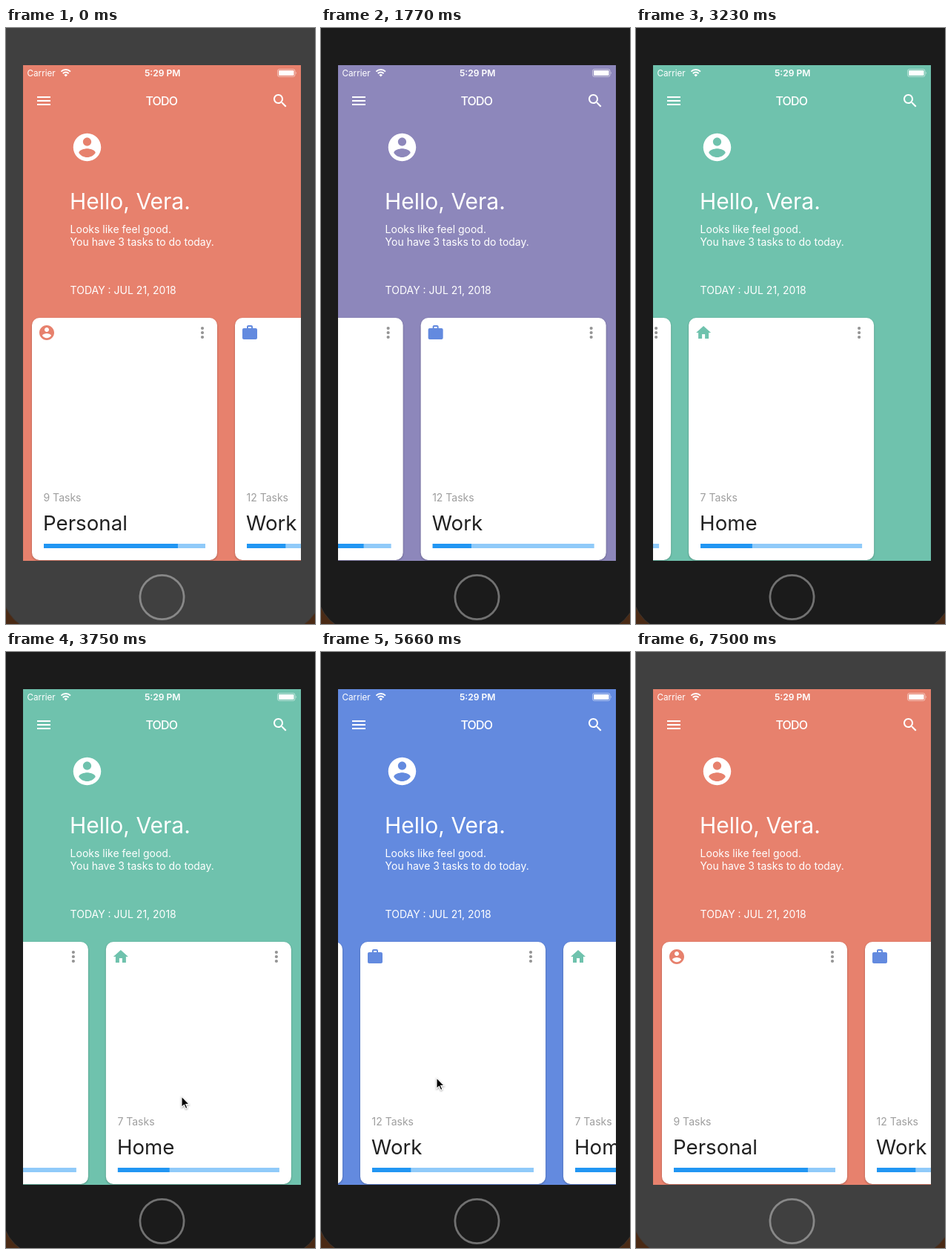
Animation of 417x802 px, one loop 7610 ms. Source, as an HTML page:

```html
<!DOCTYPE html>
<html lang="en">
<head>
<meta charset="utf-8">
<title>Todo cards</title>
<style>
  html, body { margin: 0; width: 100%; height: 100%; overflow: hidden; background: #4a2a15; }
  svg { display: block; width: 417px; height: 802px; font-family: Inter, Roboto, sans-serif; }
  .card { filter: drop-shadow(0 1px 1px rgba(0, 0, 0, .28)); }
  .small { font-size: 14px; }
</style>
</head>
<body>
<svg viewBox="0 0 417 802">
  <defs>
    <clipPath id="view"><rect x="23" y="50" width="375" height="667"/></clipPath>
    <path id="person" d="M12 2C6.48 2 2 6.48 2 12s4.48 10 10 10 10-4.48 10-10S17.52 2 12 2zm0 3c1.66 0 3 1.34 3 3s-1.34 3-3 3-3-1.34-3-3 1.34-3 3-3zm0 14.2c-2.5 0-4.71-1.28-6-3.22.03-1.99 4-3.08 6-3.08 1.99 0 5.97 1.09 6 3.08-1.29 1.94-3.5 3.22-6 3.22z"/>
    <path id="case" d="M20 6h-4V4c0-1.11-.89-2-2-2h-4c-1.11 0-2 .89-2 2v2H4c-1.11 0-2 .89-2 2v11c0 1.11.89 2 2 2h16c1.11 0 2-.89 2-2V8c0-1.11-.89-2-2-2zm-6 0h-4V4h4v2z"/>
    <path id="house" d="M10 20v-6h4v6h5v-8h3L12 3 2 12h3v8z"/>
  </defs>

  <rect id="bezel" x="-6" y="-80" width="433" height="894" rx="60" stroke="#43362d"/>
  <circle id="button" cx="210.5" cy="766" r="29.6" fill="none" stroke-width="2.8"/>

  <g clip-path="url(#view)">
    <rect id="back" x="23" y="50" width="375" height="667"/>
    <g fill="#fff">
      <text x="28.5" y="64.5" font-size="11.7">Carrier</text>
      <path d="M74.4 58.6a9 9 0 0 1 12.6 0M76.8 61.2a5.6 5.6 0 0 1 7.8 0" fill="none" stroke="#fff" stroke-width="2"/>
      <path d="M80.7 65.6l-2.3-2.4a3.3 3.3 0 0 1 4.6 0z"/>
      <text x="211.2" y="64.5" font-size="12.1" font-weight="600" text-anchor="middle">5:29 PM</text>
      <rect x="366.5" y="55.5" width="23.5" height="10" rx="2.5" fill="none" stroke="#fff" stroke-opacity=".5"/>
      <rect x="368" y="57" width="20.5" height="7" rx="1"/>
      <path d="M391 58.8q1.6 1.7 0 3.4z" opacity=".6"/>
      <path transform="translate(39 86)" d="M3 18h18v-2H3zm0-5h18v-2H3zm0-7v2h18V6z"/>
      <path transform="translate(358 86)" d="M15.5 14h-.79l-.28-.27C15.41 12.59 16 11.11 16 9.5 16 5.91 13.09 3 9.5 3S3 5.91 3 9.5 5.91 16 9.5 16c1.61 0 3.09-.59 4.23-1.57l.27.28v.79l5 4.99L20.49 19l-4.99-5zm-6 0C7.01 14 5 11.99 5 9.5S7.01 5 9.5 5 14 7.01 14 9.5 11.99 14 9.5 14z"/>
      <text x="209.8" y="103.7" font-size="16" font-weight="500" letter-spacing="-.9" text-anchor="middle">TODO</text>
      <use href="#person" transform="translate(87 138) scale(1.875)"/>
      <text x="86" y="244" font-size="30">Hello, Vera.</text>
      <text class="small" x="86.6" y="276">Looks like feel good.</text>
      <text class="small" x="86.6" y="293">You have 3 tasks to do today.</text>
      <text class="small" x="86.6" y="358">TODAY : JUL 21, 2018</text>
    </g>
    <g id="cards"></g>
  </g>

  <path id="cursor" d="M0 0V14.5L3.4 11.4 5.6 16.5 7.9 15.5 5.7 10.6H10.3z" stroke="#fff" stroke-width="1.1"
        style="filter: drop-shadow(0 1px 1px rgba(0, 0, 0, .35))"/>
</svg>

<script>
const $ = id => document.getElementById(id);
const LOOP = 7610, PAGE = 256, MAX = 447, MOVE = 500;

const TODOS = [
  { icon: 'person', tasks: 9, title: 'Personal', done: .83, color: [231, 129, 109] },
  { icon: 'case', tasks: 12, title: 'Work', done: .24, color: [99, 138, 223] },
  { icon: 'house', tasks: 7, title: 'Home', done: .32, color: [111, 194, 173] }
];

$('cards').innerHTML = TODOS.map(({ icon, tasks, title, done, color }, i) => `
  <g transform="translate(${35 + i * 274} 390)">
    <rect class="card" width="250" height="326" rx="10" fill="#fff"/>
    <use href="#${icon}" x="8" y="8" fill="rgb(${color})"/>
    ${[-6, 0, 6].map(dy => `<circle cx="230" cy="${20 + dy}" r="2.1" fill="#949494"/>`).join('')}
    <text class="small" x="15.5" y="247" fill="#9e9e9e">${tasks} Tasks</text>
    <text x="15" y="286" font-size="27.7" fill="#212121">${title}</text>
    <rect x="16" y="304" width="218" height="6" fill="#90caf9"/>
    <rect x="16" y="304" width="${218 * done}" height="6" fill="#2196f3"/>
  </g>`).join('');

// each swipe turns one page
const TURNS = [
  { at: 1553, from: 0, to: 1 },
  { at: 2745, from: 1, to: 2 },
  { at: 4630, from: 2, to: 1 },
  { at: 5879, from: 1, to: 0 }
];

// the pointer glides in, rests, then drags away and vanishes
const VISITS = [
  { enter: 600, rest: 1130, drag: 1370, leave: 1550, path: [[42, 616], [306, 544], [60, 565]] },
  { enter: 2120, rest: 2470, drag: 2650, leave: 2745, path: [[138, 568], [221, 568], [60, 566]] },
  { enter: 3460, rest: 3750, drag: 4290, leave: 4630, path: [[100, 590], [237, 598], [380, 585]] },
  { enter: 5160, rest: 5660, drag: 5720, leave: 5900, path: [[330, 590], [156, 573], [380, 588]] },
  { enter: 6130, rest: 6660, drag: 6720, leave: 6900, path: [[410, 593], [371, 688], [405, 785]] }
];

const mix = (a, b, p) => a + (b - a) * p;
const clamp = p => Math.min(1, Math.max(0, p));

// cubic-bezier(.4, 0, .2, 1)
function ease(x) {
  if (x <= 0 || x >= 1) return clamp(x);
  let lo = 0, hi = 1;
  for (let i = 0; i < 24; i++) {
    const u = (lo + hi) / 2, v = 1 - u;
    if (1.2 * v * v * u + .6 * v * u * u + u * u * u < x) lo = u; else hi = u;
  }
  return lo * lo * (3 - 2 * lo);
}

// overdamped spring: mass .5, stiffness 100, ratio 1.1
function spring(s) {
  const w = Math.sqrt(200), d = Math.sqrt(1.1 ** 2 - 1);
  const slow = w * (1.1 - d), fast = w * (1.1 + d);
  return (fast * Math.exp(-slow * s) - slow * Math.exp(-fast * s)) / (fast - slow);
}

function pose(t) {
  const turn = TURNS.findLast(({ at }) => at <= t) || { at: 0, from: 0, to: 0 };
  const { at, from, to } = turn, p = ease((t - at) / MOVE);
  const late = (t - at - MOVE) / 1000;
  let x = mix(Math.min(from * PAGE, MAX), to * PAGE, p);
  if (late > 0 && x > MAX) x = mix(MAX, x, spring(late));
  const color = TODOS[from].color.map((c, k) => Math.round(mix(c, TODOS[to].color[k], p)));
  return { x, color };
}

function pointer(t) {
  const visit = VISITS.find(v => t >= v.enter && t < v.leave);
  if (!visit) return [-99, 0];
  const { enter, rest, drag, leave, path: [a, b, c] } = visit;
  const come = clamp((t - enter) / (rest - enter)), go = clamp((t - drag) / (leave - drag));
  return [0, 1].map(k => mix(mix(a[k], b[k], come), c[k], go));
}

function draw(t) {
  const { x, color } = pose(t);
  const active = t >= 1370 && t < 7500;
  $('bezel').setAttribute('fill', active ? '#1b1b1b' : '#404040');
  $('button').setAttribute('stroke', active ? '#717171' : '#888');
  $('back').setAttribute('fill', `rgb(${color})`);
  $('cards').setAttribute('transform', `translate(${-x} 0)`);
  $('cursor').setAttribute('transform', `translate(${pointer(t)})`);
}

const began = performance.now();
function tick() {
  draw((performance.now() - began) % LOOP);
  requestAnimationFrame(tick);
}
tick();
</script>
</body>
</html>
```
